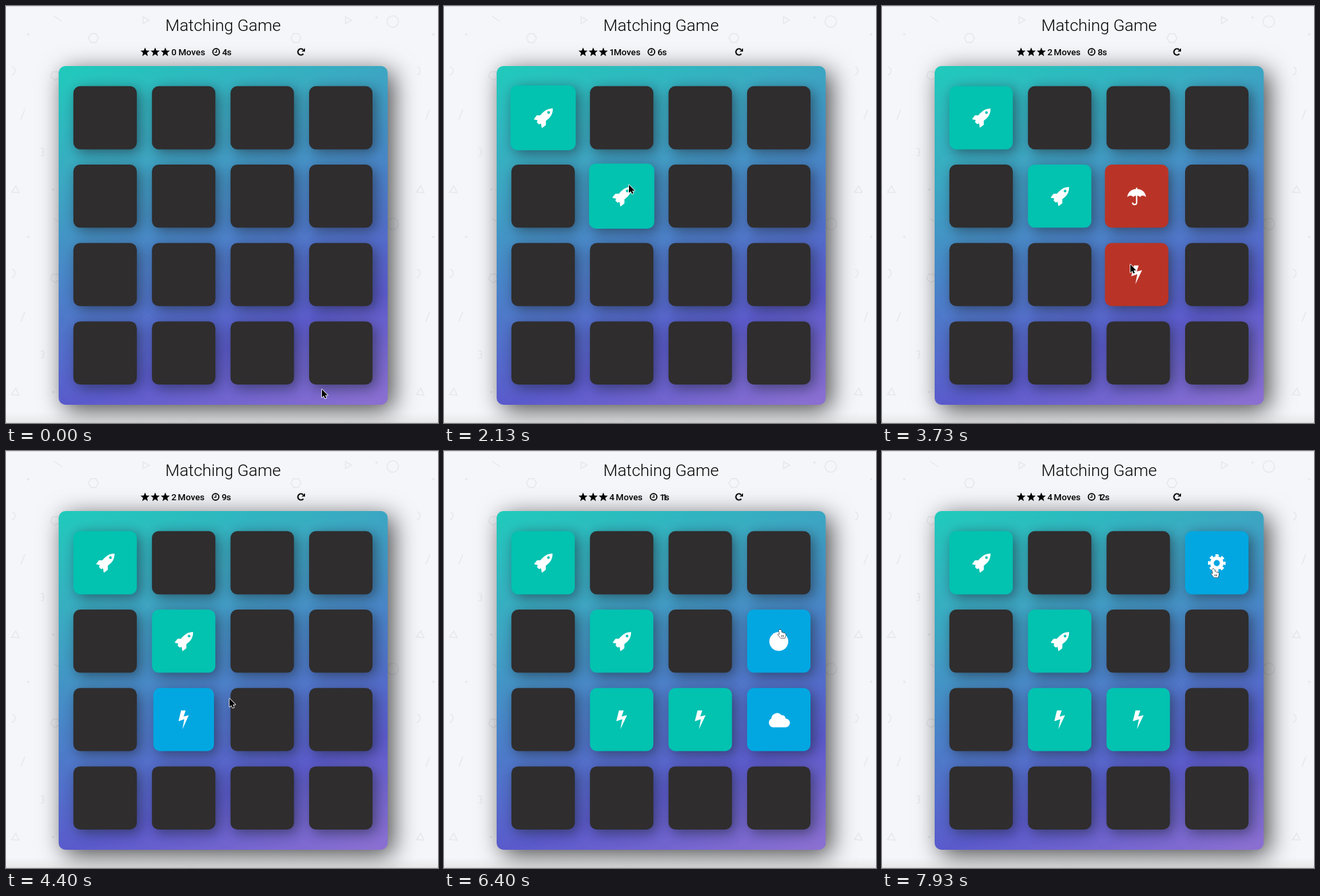
Recreate the animation shown at these times as an HTML page with a canvas. Size 640 px wide and 618 px high, loop 8 s.

```html
<!DOCTYPE html>
<html>
<head>
<meta charset="utf-8">
<title>Matching Game</title>
<style>
html, body { margin: 0; width: 100%; height: 100%; overflow: hidden; background: #f5f6fa; }
canvas { display: block; }
</style>
</head>
<body>
<canvas id="stage" width="640" height="618"></canvas>
<script>
const g = document.getElementById('stage').getContext('2d');
const LOOP = 8, FLIP = 0.6, PULSE = 0.7, RED = 0.7;
const DARK = '#2f2d2e', BLUE = '#02a7e1', GREEN = '#02c2b0', FAIL = '#b93427';

// Each turn of a card: which card, its icon, when it opens, when it is judged, the verdict
const turns = [
  { card: 0, icon: 'rocket', open: 0.7, judged: 2.05, match: true },
  { card: 5, icon: 'rocket', open: 1.65, judged: 2.05, match: true },
  { card: 6, icon: 'umbrella', open: 2.55, judged: 3.4 },
  { card: 10, icon: 'bolt', open: 3, judged: 3.4 },
  { card: 9, icon: 'bolt', open: 4.15, judged: 5.2, match: true },
  { card: 10, icon: 'bolt', open: 4.8, judged: 5.2, match: true },
  { card: 11, icon: 'cloud', open: 5.6, judged: 6.6 },
  { card: 7, icon: 'disc', open: 6.2, judged: 6.6 },
  { card: 3, icon: 'cog', open: 7.6, judged: 9 }
];
const pointer = [
  [0, 468, 568], [0.62, 150, 172], [0.9, 152, 172], [1.45, 274, 266], [2.15, 274, 265],
  [2.5, 372, 285], [2.6, 372, 286], [2.9, 368, 383], [3.75, 368, 383], [4.08, 272, 386],
  [4.22, 276, 385], [4.4, 331, 367], [4.65, 375, 385], [5.05, 376, 385], [5.45, 473, 383],
  [5.72, 474, 383], [6.1, 498, 265], [7.15, 498, 265], [7.5, 491, 175], [8, 491, 175]
];
const flipKeys = [[0, 90], [0.4, -20], [0.6, 10], [0.8, -5], [1, 0]];
const shakeKeys = [[0, 0], [0.065, -6], [0.185, 5], [0.315, -3], [0.435, 2], [0.5, 0]];

const rocket = new Path2D('M14-14C6-14 1-10-4-4L-9-4-13 1-13 2-8 3-9 6-6 9-3 8-2 14-1 14 4 10 4 4C11-1 14-6 14-14ZM10-8A2 2 0 1 0 6-8 2 2 0 1 0 10-8Z');
const bolt = new Path2D('M-4-14 3-14 0-5 8-7-2 14 1-1-8 2Z');
const canopy = new Path2D('M-14 1C-13-7-7-11-1-11V-13H1V-11C7-11 13-7 14 1 11-2 7-2 5 1 3-2-3-2-5 1-7-2-11-2-14 1Z');
const handle = new Path2D('M0-2V9A3 3 0 0 1-6 9');
const cloud = new Path2D('M-9 11A7 7 0 0 1-11-2 8.5 8.5 0 0 1 4-7 5 5 0 0 1 10-2 6.5 6.5 0 0 1 10 11Z');
const arrow = new Path2D('M0 0V12L2.7 9.6 4.6 13.6 6.6 12.7 4.8 8.8H8.6Z');
const hand = new Path2D('M-1 0Q1-1 1.8 1L2.5 4 7 5Q8.5 5.5 8 8L7 12.5H1L-3.5 7Q-3.5 5.5-1 7L-2 1Q-2 0-1 0Z');

function lerpKeys(keys, t, col = 1) {
  let i = 1;
  while (i < keys.length - 1 && keys[i][0] < t) i++;
  const a = keys[i - 1], b = keys[i];
  const u = Math.min(1, Math.max(0, (t - a[0]) / (b[0] - a[0])));
  return a[col] + (b[col] - a[col]) * u;
}
const ease = u => u * u * (3 - 2 * u);
function pointerAt(t) {
  const i = Math.max(1, pointer.findIndex(k => k[0] >= t));
  const [t0, x0, y0] = pointer[i - 1], [t1, x1, y1] = pointer[i];
  // The crossing at 4.4 s is a waypoint of one sweep, so it stays linear
  const raw = (t - t0) / (t1 - t0), u = t0 >= 4.2 && t1 <= 4.7 ? raw : ease(raw);
  return [x0 + (x1 - x0) * u, y0 + (y1 - y0) * u];
}

function shadow(x, y, blur, color) {
  g.shadowOffsetX = x; g.shadowOffsetY = y; g.shadowBlur = blur; g.shadowColor = color;
}
function box(x, y, w, h, r) {
  g.beginPath();
  g.roundRect(x, y, w, h, r);
  g.fill();
}
function ring(x, y, r, from = 0, to = 7) {
  g.beginPath();
  g.arc(x, y, r, from, to);
  g.stroke();
}
function disc(x, y, r) {
  g.beginPath();
  g.arc(x, y, r, 0, 7);
  g.fill();
}
function polygon(x, y, r, n, turn = 0, inner = 0) {
  const count = inner ? 2 * n : n;
  g.beginPath();
  for (let i = 0; i < count; i++) {
    const a = turn + i * 2 * Math.PI / count, d = inner && i % 2 ? inner : r;
    g.lineTo(x + d * Math.cos(a), y + d * Math.sin(a));
  }
  g.closePath();
}
function line(...p) {
  g.beginPath();
  for (let i = 0; i < p.length; i += 2) g.lineTo(p[i], p[i + 1]);
  g.stroke();
}

function tile() {
  g.lineWidth = 1.5;
  g.strokeStyle = g.fillStyle = '#e6e8ec';
  ring(273, 23, 8.5);
  polygon(129.5, 47.5, 7.5, 6); g.stroke();
  polygon(73, 103, 7, 5, 0.3); g.stroke();
  polygon(206, 21, 6, 3); g.stroke();
  polygon(14, 273, 6.5, 3, 0.6); g.stroke();
  line(22, 168, 28, 153);
  line(71, 15, 83, 23);
  ring(7, 96, 6.5, -1.2, 1.3);
  ring(53, 214, 2.8, -2, 1.5);
  ring(53, 219, 2.8, -1.5, 2);
  for (const [x, y] of [[33, 42], [249, 17], [70, 272]]) disc(x, y, 1.8);
}

function background() {
  g.fillStyle = '#f5f6fa';
  g.fillRect(0, 0, 640, 618);
  for (let x = 0; x < 640; x += 300)
    for (let y = 0; y < 618; y += 300) {
      g.save();
      g.translate(x, y);
      tile();
      g.restore();
    }
  g.fillStyle = '#f5f6fa';
  g.fillRect(232, 8, 180, 34);
  const foot = g.createLinearGradient(0, 602, 0, 618);
  foot.addColorStop(0, 'rgba(225,225,225,0)');
  foot.addColorStop(1, 'rgba(225,225,225,.7)');
  g.fillStyle = foot;
  g.fillRect(0, 602, 640, 16);
  g.fillStyle = '#d8d8da';
  g.fillRect(0, 0, 640, 1);
  g.fillRect(0, 617, 640, 1);
}

function board() {
  const fill = g.createLinearGradient(213, 40, 431, 640);
  ['#1fcbbb', '#3aa9c2', '#4a80c9', '#5a59cc', '#8d70d2']
    .forEach((c, i) => fill.addColorStop(i / 4, c));
  g.fillStyle = fill;
  shadow(8, 8, 36, 'rgba(0,0,0,.7)');
  box(78, 89, 487.5, 502, 10);
  shadow(0, 0, 0, 'transparent');
}

const icons = {
  rocket: () => g.fill(rocket, 'evenodd'),
  bolt: () => g.fill(bolt),
  cloud: () => g.fill(cloud),
  disc: () => disc(0, 0, 14),
  umbrella() {
    g.fill(canopy);
    g.lineWidth = 2;
    g.stroke(handle);
  },
  cog() {
    g.lineWidth = 5.5;
    ring(0, 0, 7.3, 0, 2 * Math.PI);
    g.lineWidth = 3.6;
    g.setLineDash([5, 3.875]);
    g.lineDashOffset = 2.5;
    ring(0, 0, 11.3, 0, 2 * Math.PI);
    g.setLineDash([]);
  }
};

const turnOf = (card, t) => turns.find(k =>
  k.card === card && t >= k.open && (k.match || t < k.judged + RED));

function drawCard(card, t) {
  const turn = turnOf(card, t);
  let color = DARK, dx = 0, sx = 1, sy = 1;
  if (turn) {
    const since = t - turn.judged;
    sx = Math.cos(lerpKeys(flipKeys, (t - turn.open) / FLIP) * Math.PI / 180);
    color = BLUE;
    if (since >= 0) {
      color = turn.match ? GREEN : FAIL;
      if (turn.match) sx = sy = 1 + 0.085 * Math.sin(Math.PI * Math.min(1, since / PULSE));
      else dx = lerpKeys(shakeKeys, since);
    }
  }
  g.save();
  g.translate(146.8 + card % 4 * 116.4 + dx, 165.6 + (card >> 2) * 116.2);
  g.scale(sx, sy);
  shadow(5, 5, 20, 'rgba(30,36,50,.6)');
  g.fillStyle = color;
  box(-47, -46.8, 94, 93.6, 10);
  shadow(0, 0, 0, 'transparent');
  if (turn) {
    g.fillStyle = g.strokeStyle = '#fff';
    g.translate(0, 0.5);
    icons[turn.icon]();
  }
  g.restore();
}

// Digits of uneven width, as in the heading's narrow face; returns the next x
function digits(n, x) {
  for (const d of String(n)) {
    g.fillText(d, x, 73);
    x += d === '1' ? 3.8 : d === '0' ? 7.8 : 7;
  }
  return x;
}

function header(t) {
  g.fillStyle = g.strokeStyle = '#000';
  g.textAlign = 'center';
  g.font = '300 24.5px Roboto, "Liberation Sans", sans-serif';
  g.fillText('Matching Game', 321.5, 37);
  g.textAlign = 'left';
  g.font = '500 13.3px Roboto, "Liberation Sans", sans-serif';
  for (const x of [206, 221, 236]) {
    polygon(x, 68.5, 7, 5, -Math.PI / 2, 3.1);
    g.fill();
  }
  const moves = [1.65, 3, 4.8, 6.2].filter(m => t >= m).length;
  const x = digits(moves, 245);
  g.fillText('Moves', x + 2.6, 73);
  g.lineWidth = 1.7;
  ring(x + 58.5, 68, 4.9);
  g.lineWidth = 1.3;
  line(x + 59, 65, x + 59, 68.7, x + 56.3, 68.7);
  g.fillText('s', digits(4 + Math.floor(t + 0.73), x + 67.5), 73);
  g.lineWidth = 2;
  ring(437, 68, 4.6, 0.7, 5.5);
  g.beginPath();
  g.moveTo(443, 62.5);
  g.lineTo(443, 67.5);
  g.lineTo(438, 67.5);
  g.fill();
}

function drawPointer(t) {
  const [x, y] = pointerAt(t);
  const col = (x - 99.8) / 116.4, row = (y - 118.8) / 116.2;
  const inside = col >= 0 && row >= 0 && col < 4 && row < 4 && col % 1 < 0.807 && row % 1 < 0.805;
  const turn = inside && turnOf(Math.floor(row) * 4 + Math.floor(col), t);
  const clickable = inside && !(turn && t >= turn.judged);
  g.save();
  g.translate(x, y);
  g.lineJoin = 'round';
  g.lineWidth = clickable ? 1 : 1.6;
  g.strokeStyle = clickable ? '#000' : '#fff';
  g.fillStyle = clickable ? '#fff' : '#000';
  const shape = clickable ? hand : arrow;
  g.stroke(shape);
  g.fill(shape);
  if (clickable) {
    g.lineWidth = 0.8;
    line(2.3, 8, 2.3, 10.5);
    line(4.5, 8, 4.5, 10.5);
  }
  g.restore();
}

function frame(now) {
  const t = now / 1000 % LOOP;
  background();
  board();
  header(t);
  for (let card = 0; card < 16; card++) drawCard(card, t);
  drawPointer(t);
  requestAnimationFrame(frame);
}
requestAnimationFrame(frame);
</script>
</body>
</html>
```
